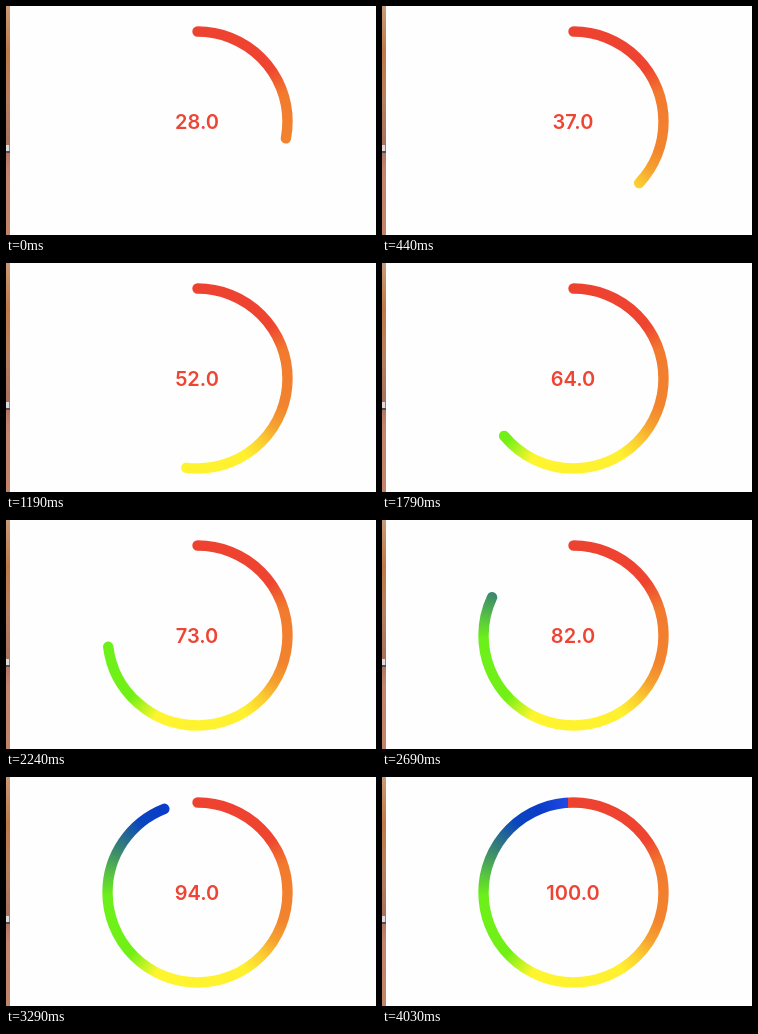
Write an HTML page with a canvas that moves like this. It is 370 px wide and 229 px high and loops after 4.57 s.

```html
<!DOCTYPE html>
<html lang="en">
<head>
<meta charset="utf-8">
<title>Progress ring</title>
<style>
  html, body { margin: 0; width: 100%; height: 100%; overflow: hidden; background: #fefefe; }
  canvas, svg { position: absolute; left: 0; top: 0; width: 370px; height: 229px; }
  text { font: 600 20px Inter, Roboto, sans-serif; fill: #ee4434; text-anchor: middle; }
</style>
</head>
<body>
<canvas id="ring"></canvas>
<svg viewBox="0 0 370 229">
  <defs>
    <linearGradient id="wall" x1="0" y1="0" x2="0" y2="1">
      <stop offset="0" stop-color="#c99a78"/>
      <stop offset=".2" stop-color="#c07a48"/>
      <stop offset=".4" stop-color="#b9805e"/>
      <stop offset=".6" stop-color="#a8725e"/>
      <stop offset=".72" stop-color="#c48570"/>
      <stop offset="1" stop-color="#c08468"/>
    </linearGradient>
  </defs>
  <rect width="4" height="229" fill="url(#wall)"/>
  <rect y="139" width="3" height="6" fill="#dcdce0"/>
  <rect y="145" width="4" height="2" fill="#5c4a4c"/>
  <text id="label" x="191" y="122.7"></text>
</svg>
<script>
const W = 370, H = 229, CX = 191.5, CY = 115.5, R = 90, THICK = 10.4;
const LOOP = 4570, STEP = 150, SEAM = 3.4;
const rad = deg => deg * Math.PI / 180;

// clockwise degrees from the top, colour
const stops = [
  [0, '#ee4230'], [54, '#ee4430'], [72, '#f27a2e'], [108, '#f2842e'],
  [122, '#f6a22f'], [134, '#fccd31'], [148, '#fff030'], [207, '#fff52f'],
  [216, '#c2f323'], [227, '#72f016'], [268, '#6cf01a'], [281, '#58c540'],
  [295, '#3f9068'], [308, '#266a90'], [321, '#0a45c0'], [338, '#0a3cc8'],
  [355, '#1f48e2']
];

const ring = document.getElementById('ring');
const label = document.getElementById('label');
const ctx = ring.getContext('2d');
const scale = window.devicePixelRatio || 1;
ring.width = W * scale;
ring.height = H * scale;
ctx.scale(scale, scale);

const hue = ctx.createConicGradient(rad(-90 - SEAM), CX, CY);
for (const [deg, color] of stops) hue.addColorStop((deg + SEAM) / 360, color);
ctx.strokeStyle = hue;
ctx.lineWidth = THICK;
ctx.lineCap = 'round';

function valueAt(t) {
  const ticks = t < STEP ? 0 : Math.floor((t + 10) / STEP);
  return Math.min(100, 28 + 3 * ticks);
}

function draw(t) {
  const value = valueAt(t);
  ctx.clearRect(0, 0, W, H);
  ctx.beginPath();
  ctx.arc(CX, CY, R, rad(-90), rad(value * 3.6 - 90));
  ctx.stroke();
  label.textContent = value.toFixed(1);
}

const start = performance.now();
function tick() {
  draw((performance.now() - start) % LOOP);
  requestAnimationFrame(tick);
}
tick();
</script>
</body>
</html>
```
